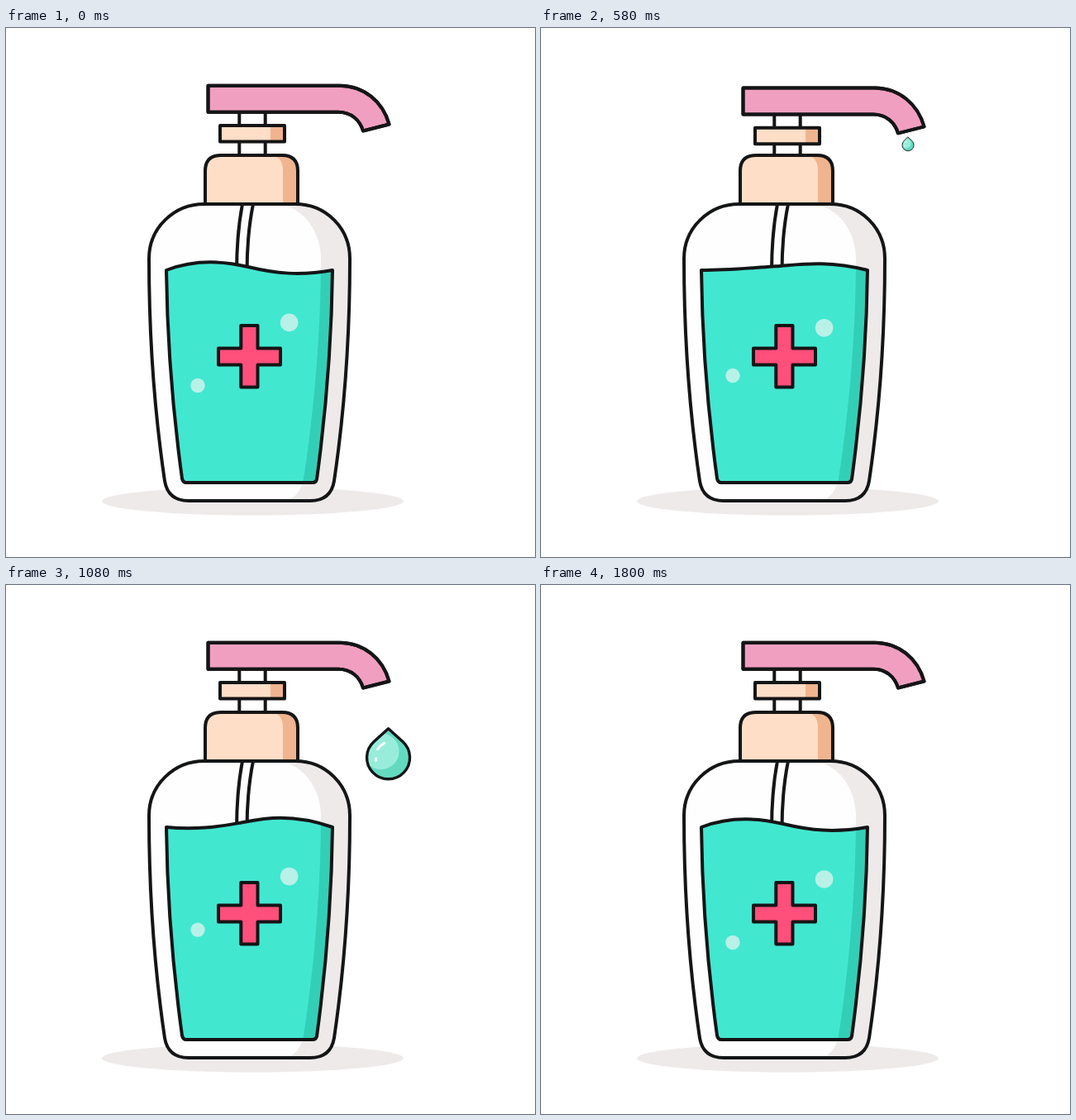
An HTML page for the animation above (1820 ms loop, 640 by 640 pixels).

```html
<!DOCTYPE html>
<html lang="en">
<head>
<meta charset="utf-8">
<title>Hand sanitizer</title>
<style>
  html, body { margin: 0; height: 100%; overflow: hidden; background: #fff; }
  svg { display: block; width: 100vw; height: 100vh; }
  .line { stroke: #141516; stroke-width: 4; stroke-linejoin: round; stroke-linecap: round; }
</style>
</head>
<body>
<svg viewBox="0 0 640 640" fill="none">
  <defs>
    <path id="body" d="M240 213H350C387 213 416 242 416 279C416 370 410 460 397 548Q393 572 368 572H221Q196 572 192 548C179 460 173 370 173 279C173 242 203 213 240 213Z"/>
    <path id="side" d="M333 213C362 220 381 247 381 280C381 370 372 470 360 545Q356 566 340 572H440V200Z"/>
    <path id="liquid"/>
    <path id="bead" d="M0-30.5L17.4-14.8A26 26 0 1 1-17.4-14.8Z"/>
    <clipPath id="inBody"><use href="#body"/></clipPath>
    <clipPath id="inLiquid"><use href="#liquid"/></clipPath>
    <clipPath id="inBead"><use href="#bead"/></clipPath>
  </defs>

  <ellipse cx="298.5" cy="572.5" rx="182.5" ry="17" fill="#eeeaea"/>

  <!-- bottle -->
  <use href="#body" fill="#fefefe"/>
  <use href="#side" fill="#eeeaea" clip-path="url(#inBody)"/>
  <path class="line" d="M286 213Q279 250 279 296M299 213Q291.5 250 291.5 296"/>
  <use href="#liquid" fill="#42e7d0"/>
  <use href="#side" fill="#32cfb6" clip-path="url(#inLiquid)"/>
  <use href="#liquid" class="line"/>
  <g fill="#b8f1e7">
    <circle id="bubbleR" cx="342.6" r="10.8"/>
    <circle id="bubbleL" cx="232" r="8.7"/>
  </g>
  <path class="line" fill="#ff4f7b" d="M284.3 360H304.5V387.5H332V407.5H304.5V434.5H284.3V407.5H257V387.5H284.3Z"/>
  <use href="#body" class="line"/>

  <!-- pump -->
  <path class="line" fill="#fefefe" d="M282.3 100V154M313.7 100V154"/>
  <path fill="#ffdec7" d="M241 213V173Q241 154 260 154H334Q353 154 353 173V213Z"/>
  <path fill="#f0b48f" d="M318 154Q335 154 335 172V213H353V173Q353 154 334 154Z"/>
  <path class="line" d="M241 213V173Q241 154 260 154H334Q353 154 353 173V213Z"/>
  <g id="collar">
    <path fill="#ffdec7" d="M259 118H337V137.5H259Z"/>
    <path fill="#f0b48f" d="M320 118H337V137.5H320Z"/>
    <path class="line" d="M259 118H337V137.5H259Z"/>
  </g>
  <g id="drop">
    <use href="#bead" fill="#63dabf"/>
    <circle cx="-9" cy="-3" r="22" fill="#98edda" clip-path="url(#inBead)"/>
    <path d="M-13-5.5Q-10-10-5-13M-15 5.5V8" stroke="#fff" stroke-width="3" stroke-linecap="round"/>
    <use href="#bead" class="line" style="stroke-width:3.4"/>
  </g>
  <g id="head">
    <path id="spout" fill="#f19fc0" d="M244.5 69.7H404C433 70 456 89 463.5 116.5L432 124.5C428 111 417 101.7 402 101.7H244.5Z"/>
    <path fill="#da82aa" d="M400 69.7Q433 80 442 122L463.5 116.5C456 89 433 70 404 69.7Z"/>
    <use href="#spout" class="line" style="fill:none"/>
    <path class="line" d="M244.5 69.7H404C433 70 456 89 463.5 116.5L432 124.5C428 111 417 101.7 402 101.7H244.5Z"/>
  </g>
</svg>
<script>
const LOOP = 1820;
const el = id => document.getElementById(id);
const move = (id, x, y, s = 1) =>
  el(id).setAttribute('transform', `translate(${x} ${y}) scale(${s})`);
const smooth = u => u * u * (3 - 2 * u);

// Eased steps between [time, value] keys
function eased(keys, t) {
  if (t <= keys[0][0]) return keys[0][1];
  for (let i = 1; i < keys.length; i++) {
    const [a, p] = keys[i - 1], [b, q] = keys[i];
    if (t < b) return p + (q - p) * smooth((t - a) / (b - a));
  }
  return keys[keys.length - 1][1];
}

// Smooth curve through [time, value] keys, flat at turning points
function curve(keys, t) {
  const last = keys.length - 1;
  if (t <= keys[0][0]) return keys[0][1];
  if (t >= keys[last][0]) return keys[last][1];
  const slope = i => {
    const [a, p] = keys[Math.max(i - 1, 0)], [b, q] = keys[Math.min(i + 1, last)];
    const v = keys[i][1];
    return i > 0 && i < last && (v - p) * (q - v) <= 0 ? 0 : (q - p) / (b - a);
  };
  const i = keys.findIndex(k => k[0] > t) - 1;
  const [a, p] = keys[i], [b, q] = keys[i + 1];
  const d = b - a, u = (t - a) / d, e = smooth(u);
  return p + (q - p) * e + d * u * (1 - u) * (slope(i) * (1 - u) - slope(i + 1) * u);
}

const press = [[100, 0], [400, 21], [635, 0], [855, 21], [1075, 0]];
const dropX = [[400, 441], [580, 444], [860, 451.7], [1080, 462.5], [1360, 478], [1600, 489]];
const dropY = [[400, 130], [580, 140.3], [860, 167.7], [1080, 204], [1360, 297.5], [1600, 396]];
const dropSize = [[400, 0], [580, .27], [860, .74], [1080, 1], [1360, .44], [1590, 0]];

// Surface control points at the two ends of the slosh
const waveA = [225, 281, 260, 281, 293, 289, 355, 300];
const waveB = [229, 298, 255, 294, 280, 288, 340, 272];

function draw(t) {
  const half = LOOP / 2;
  const w = smooth(1 - Math.abs(t - half) / half);
  const [a, b, c, d, e, f, g, h] = waveA.map((v, i) => v + (waveB[i] - v) * w);
  el('liquid').setAttribute('d',
    `M194 293C${a} ${b} ${c} ${d} ${e} ${f}S${g} ${h} 395 293` +
    'C394 380 387 465 376 546Q375 550 371 550H218Q214 550 213 545C202 465 195 380 194 293Z');
  el('bubbleL').setAttribute('cy', 432.5 - 17 * w);
  el('bubbleR').setAttribute('cy', 356.4 + 7 * Math.sin(2 * Math.PI * t / LOOP));

  const y = eased(press, t);
  move('head', 0, y);
  move('collar', 0, Math.min(y, 8));
  move('drop', curve(dropX, t), curve(dropY, t), curve(dropSize, t));
}

function tick() {
  draw(performance.now() % LOOP);
  requestAnimationFrame(tick);
}
tick();
</script>
</body>
</html>
```
